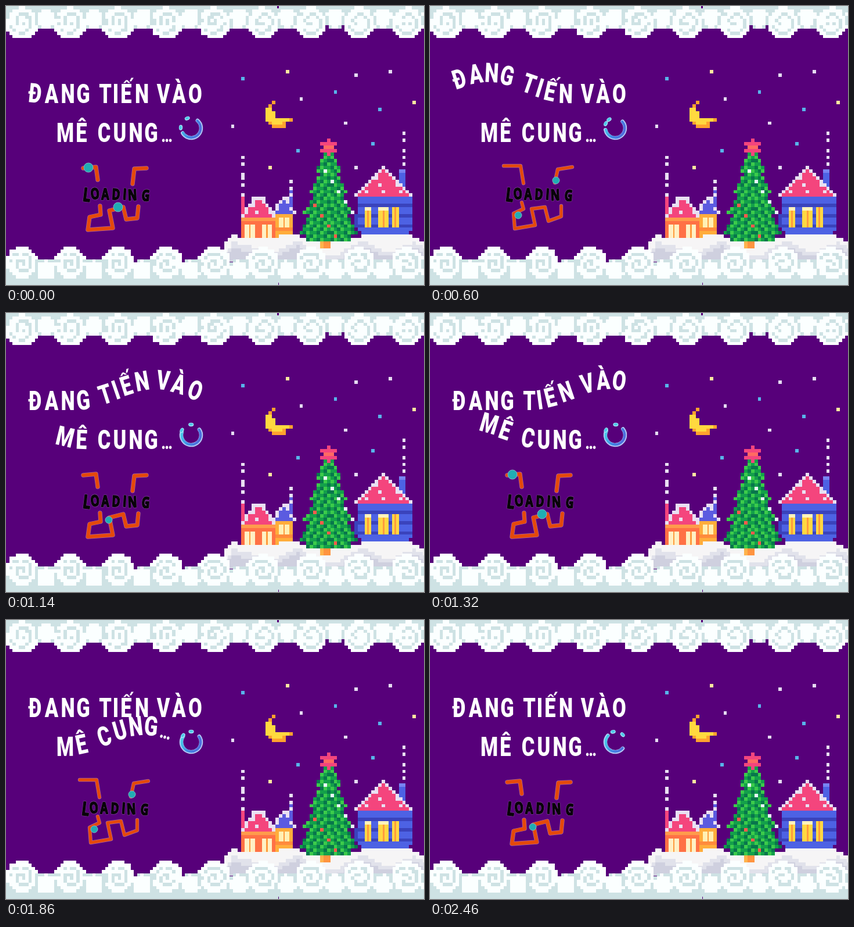
Recreate the animation shown at these times as an HTML page with a canvas. Size 720 by 480 pixels, loop 2520 ms.

```html
<!DOCTYPE html>
<html lang="vi">
<head>
<meta charset="utf-8">
<style>
  html, body { margin: 0; width: 100%; height: 100%; overflow: hidden; background: #57007a; }
  canvas { display: block; }
</style>
</head>
<body>
<canvas id="stage" width="720" height="480"></canvas>
<script>
const LOOP = 2520, TICK = 60;
const PURPLE = '#57007a', WHITE = '#fbffff', PALE = '#cee2e4', PINK = '#f4457d', FROST = '#e9e0f2';
const stage = document.getElementById('stage');
const backdrop = document.createElement('canvas');
backdrop.width = 720;
backdrop.height = 480;
let ctx = backdrop.getContext('2d');

// ---------- pixel-art scenery ----------
const CELL = 5.9;
const edgeX = c => Math.round(375.75 + c * CELL);
const edgeY = r => Math.round(110.05 + r * CELL);

function block(c, r, w, h, color) {
  ctx.fillStyle = color;
  const x = edgeX(c), y = edgeY(r);
  ctx.fillRect(x, y, edgeX(c + w) - x, edgeY(r + h) - y);
}

function paint(c0, r0, c1, r1, colorAt) {
  for (let r = r0; r < r1; r++)
    for (let c = c0; c < c1; c++) {
      const color = colorAt(c, r);
      if (color) block(c, r, 1, 1, color);
    }
}

function drawStars() {
  const groups = {
    '#e6dcf2': [[2, 16], [22, 8], [38, 1], [48, 0], [35, 15], [38, 28]],
    '#58b4ea': [[5, 2], [32, 6], [45, 11], [43, 21], [21, 23]],
    '#ffe9a0': [[18, 0], [55, 9], [13, 28]]
  };
  for (const color in groups)
    for (const [c, r] of groups[color]) block(c, r, 1, 1, color);
}

function drawMoon() {
  paint(12, 9, 20, 17, (c, r) => {
    const outer = Math.hypot(c - 15, r - 12.5), inner = Math.hypot(c - 17.1, r - 10.5);
    if (outer > 3.85 || inner < 3.3) return null;
    return outer > 3.1 && (r > 14 || r < 11) ? '#ffa22e' : '#ffd93f';
  });
  block(19, 14, 1, 1, '#ffa22e');
  block(17, 16, 1, 1, '#ffa22e');
}

function roof(mid, top, rows, half, grow, color) {
  for (let i = 0; i < rows; i++) {
    const left = Math.round(mid - half - i * grow), right = Math.round(mid + half + i * grow);
    paint(left, top + i, right, top + i + 1, c => {
      const edge = c === left || c === right - 1;
      return edge || (c + 2 * i) % 5 === 0 && i % 2 ? FROST : color;
    });
  }
}

function smoke(col, rows) {
  for (const r of rows) block(col, r, 1, 1, FROST);
}

function windowPane(c, r, w, h, glow) {
  block(c, r, w, h, glow);
  block(c + w / 2 - 0.25, r, 0.5, h, '#ff9b3d');
}

function drawHouses() {
  block(15, 42, 5, 7, '#ffad3b');
  block(15, 46, 5, 1, '#ff8b3c');
  windowPane(16, 43, 3, 3, '#fff0b4');
  roof(17.5, 37, 5, 1, 0.55, '#5b5be0');
  block(19, 35, 1, 5, '#5b5be0');
  smoke(19, [32, 34, 36]);

  block(5, 37, 1, 5, PINK);
  smoke(5, [25, 27, 30, 31, 33, 36]);
  block(5, 43, 10, 7, '#ff7145');
  block(5, 43, 10, 1, '#ff9b4c');
  windowPane(6, 45, 3, 4, '#fff0c4');
  windowPane(11, 45, 3, 4, '#fff0c4');
  roof(10, 38, 5, 2, 0.8, PINK);
  block(8, 37, 4, 1, FROST);

  paint(39, 37, 55, 49, (c, r) =>
    r > 46 && (c === 39 || c === 54) ? null : r % 3 ? '#4d62e4' : '#3a43bc');
  block(38, 42, 1, 4, '#3a43bc');
  windowPane(41, 40, 2, 6, '#ffd842');
  windowPane(45, 40, 3, 6, '#ffd842');
  windowPane(49, 40, 2, 6, '#ffd842');
  block(41, 40, 2, 1, '#fff3bb');
  block(45, 40, 3, 1, '#fff3bb');
  block(51, 30, 2, 6, '#4d62e4');
  block(51, 29, 2, 1, '#7884f2');
  smoke(52, [18, 20, 23, 25, 27]);
  roof(46.5, 28, 9, 0.7, 0.94, PINK);
}

function drawSnow() {
  const ridge = [[0, 50], [2, 48], [5, 49.5], [14, 48.6], [21, 48.2], [24, 50], [36, 49.4], [40, 48.4], [53, 48], [56, 49], [59, 51]];
  const topAt = c => {
    const k = Math.max(1, ridge.findIndex(p => p[0] >= c));
    const [a, b] = [ridge[k - 1], ridge[k]];
    return a[1] + (b[1] - a[1]) * (c - a[0]) / (b[0] - a[0]);
  };
  paint(0, 47, 59, 56, (c, r) => {
    const depth = r - topAt(c);
    if (depth < -0.5) return null;
    const shade = depth + 1.6 * Math.sin(c * 0.36);
    return shade > 4.2 ? '#cfd0df' : shade > 2.6 ? '#e1e2eb' : '#f6f5f6';
  });
}

function drawTree() {
  const baubles = ['#ff5a4c', '#ffe05a', '#ff7fae', '#eaf6ff', '#ff9b3d'];
  block(28, 49, 3, 3, '#ff9440');
  block(28, 49, 1, 3, '#ffb34c');
  paint(21, 24, 40, 50, (c, r) => {
    const t = r - 24, dx = c - 30;
    const half = 1 + t * 0.255 + (t % 6) / 6 * 2 - (t > 23 ? 1 : 0);
    if (Math.abs(dx) > half) return null;
    if ((c * 7 + r * 5) % 29 === 0) return baubles[(c + r) % 5];
    const tone = (c * 2 + r * 3 + (dx > 0 ? r : 0)) % 7;
    return tone < 2 ? '#3ccb4b' : tone < 5 ? '#13a04a' : '#08764c';
  });
  block(30, 20, 1, 5, PINK);
  block(28, 21, 5, 1, PINK);
  block(29, 22, 3, 1, '#ff6a62');
  block(28, 23, 2, 1, PINK);
  block(31, 23, 2, 1, PINK);
}

// Swirled clouds; "depth" counts from the outer edge of the stage.
function cloudBorder(bottom) {
  const size = 5.5, bigY = bottom ? 36 : 27, smallY = bottom ? 25 : 21;
  const wrap = (x, mid) => (x - mid + 8300 + 41.5) % 83 - 41.5;
  for (let row = 0; row < 12; row++)
    for (let col = 0; col < 131; col++) {
      const x = (col + 0.5) * size, y = (row + 0.5) * size;
      const bx = wrap(x, 27), by = y - bigY, d = Math.hypot(bx, by);
      const s = Math.hypot(wrap(x, 68.5), y - smallY);
      let color = y < (bottom ? 30 : 26) ? PALE : null;
      if (s < 20) color = PALE;
      if (s < 16.5) color = WHITE;
      if (d < 29) {
        const turn = Math.atan2(by, bx) / (2 * Math.PI) + 1;
        const coil = (d / 13 - turn + 3) % 1;
        color = d < 21 && coil < 0.38 ? PALE : WHITE;
        if (d > 25 && by < 6) color = PALE;
      }
      if (!color) continue;
      ctx.fillStyle = color;
      const left = Math.round(col * size), top = Math.round(row * size);
      const w = Math.round((col + 1) * size) - left, h = Math.round((row + 1) * size) - top;
      ctx.fillRect(left, bottom ? 480 - top - h : top, w, h);
    }
}

function drawBackdrop() {
  ctx.fillStyle = PURPLE;
  ctx.fillRect(0, 0, 720, 480);
  drawStars();
  drawMoon();
  drawHouses();
  drawSnow();
  drawTree();
  cloudBorder(false);
  cloudBorder(true);
  ctx.fillStyle = PURPLE;
  ctx.fillRect(467, 0, 3, 4);
  ctx.fillRect(469, 476, 1, 4);
}

// ---------- waving title ----------
const LINES = [
  { glyphs: 'ĐANGTIẾNVÀO', at: [50, 78.5, 106.5, 133, 171, 189, 207, 234, 271, 298, 326], y: 150.5, crest: t => 100 + 0.29 * (t - 600) },
  { glyphs: 'MÊCUNG…', at: [102, 130, 169, 196, 223.5, 250, 277], y: 217.5, crest: t => 58 + t / 3 - 440 }
];
const RISE = 36, REACH = 137, CONDENSED = 0.74;

function drawTitle(t) {
  ctx.fillStyle = '#fff';
  ctx.textAlign = 'center';
  for (const line of LINES)
    [...line.glyphs].forEach((glyph, i) => {
      const dx = line.at[i] - line.crest(t);
      const near = Math.abs(dx) < REACH;
      const lift = near ? RISE * Math.cos(Math.PI * dx / (2 * REACH)) ** 2 : 0;
      const slope = near ? RISE * Math.PI / (2 * REACH) * Math.sin(Math.PI * dx / REACH) : 0;
      ctx.save();
      ctx.translate(line.at[i], line.y - lift);
      ctx.rotate(Math.atan(slope) * 0.85);
      ctx.scale(CONDENSED, 1);
      ctx.font = `900 ${glyph === '…' ? 34 : 46.5}px Roboto, sans-serif`;
      ctx.fillText(glyph, 0, 16.5);
      ctx.restore();
    });
}

// ---------- smiling spinner ----------
// time, right end, left end, two eyes (degrees)
const SMILE = [
  [0, -50, 150, 183, 248], [600, -42, 170, 205, 234], [900, -30, 185, 205, 264], [1320, -38, 205, 208, 273],
  [1860, -35, 215, 218, 270], [2220, 15, 220, 245, 301], [2460, 40, 222, 258, 315]
];

function smileAt(t) {
  const k = SMILE.findIndex(p => p[0] > t);
  if (k < 0) return SMILE[SMILE.length - 1];
  const a = SMILE[k - 1], b = SMILE[k], f = (t - a[0]) / (b[0] - a[0]);
  return a.map((v, i) => v + (b[i] - v) * f);
}

function drawSpinner(t) {
  const [, right, left, ...eyes] = smileAt(t).map((v, i) => i ? v * Math.PI / 180 : v);
  ctx.save();
  ctx.translate(319, 210);
  ctx.lineCap = 'round';
  const blue = ctx.createLinearGradient(-18, -6, 18, 8);
  blue.addColorStop(0, '#49d5ea');
  blue.addColorStop(0.5, '#3f86e4');
  blue.addColorStop(1, '#5268dc');
  for (const [width, color, r] of [[6.5, '#b4cdf6', 17], [4.2, blue, 16.3]]) {
    ctx.lineWidth = width;
    ctx.strokeStyle = color;
    ctx.beginPath();
    ctx.arc(0, 0, r, right, left);
    ctx.stroke();
  }
  for (const a of eyes) {
    ctx.save();
    ctx.rotate(a);
    ctx.beginPath();
    ctx.ellipse(18, 0, 3.2, 4.6, 0, 0, 2 * Math.PI);
    ctx.fillStyle = '#a6e6f6';
    ctx.fill();
    ctx.beginPath();
    ctx.ellipse(18.4, 0, 2.2, 3.4, 0, 0, 2 * Math.PI);
    ctx.fillStyle = '#4ec9ea';
    ctx.fill();
    ctx.restore();
  }
  ctx.restore();
}

// ---------- hand-drawn maze ----------
const POSES = [
  { width: 6, shift: 2, paths: [
    [[133, 279], [155, 277], [158, 299]],
    [[242, 279], [221, 280], [218, 306]],
    [[162, 344], [163, 359], [144, 363], [141, 385], [184, 382], [178, 352], [202, 346], [207, 367], [226, 365], [228, 345]]] },
  { width: 5, shift: 0, paths: [
    [[127, 275], [156, 275], [161, 305]],
    [[245, 277], [220, 281], [215, 304]],
    [[158, 338], [161, 349], [144, 357], [146, 383], [181, 377], [175, 349], [198, 346], [204, 370], [226, 362], [226, 344]]] }
];
const UPPER_BALL = [[142, 278], [157, 284], [159, 300], [217, 300], [218, 290], [220, 280], [245, 274], null];
const LOWER_BALL = [[193, 346], [206, 366], [227, 348], [152, 360], [143, 370], [146, 381], [168, 379], [177, 356]];
const BALL_SIZE = [8, 8, 7, 6, 7, 7, 7, 6];

function lettering(shift) {
  const at = [137, 153, 170, 188, 203, 217, 239];
  const drop = [336, 332, 333, 333, 333, 334, 335];
  ctx.lineJoin = 'round';
  ctx.textAlign = 'center';
  [...'LOADING'].forEach((glyph, i) => {
    ctx.save();
    ctx.translate(at[i] + shift - 1, drop[i]);
    ctx.rotate([0.12, -0.1, 0, 0.04, 0.06, -0.05, 0.08][i]);
    ctx.scale(CONDENSED, 1);
    ctx.font = `700 ${i ? 26 : 32}px "Open Sans", sans-serif`;
    ctx.lineWidth = 3.2;
    ctx.strokeStyle = 'rgba(190, 150, 205, .5)';
    ctx.strokeText(glyph, 0, 0);
    ctx.lineWidth = 2;
    ctx.strokeStyle = ctx.fillStyle = '#080309';
    ctx.strokeText(glyph, 0, 0);
    ctx.fillText(glyph, 0, 0);
    ctx.restore();
  });
}

function drawMaze(t) {
  const step = Math.floor(t % (LOOP / 2) / (LOOP / 16));
  const pose = POSES[step > 1 && step < 7 ? 1 : 0];
  ctx.lineCap = ctx.lineJoin = 'round';
  for (const [extra, color] of [[1.4, 'rgba(225, 175, 190, .6)'], [0, '#e5490b']]) {
    ctx.lineWidth = pose.width + extra;
    ctx.strokeStyle = color;
    for (const path of pose.paths) {
      ctx.beginPath();
      path.forEach(([x, y]) => ctx.lineTo(x, y));
      ctx.stroke();
    }
  }
  lettering(pose.shift);
  for (const ball of [UPPER_BALL[step], LOWER_BALL[step]]) {
    if (!ball) continue;
    ctx.beginPath();
    ctx.arc(ball[0], ball[1], BALL_SIZE[step], 0, 2 * Math.PI);
    ctx.fillStyle = '#20adb4';
    ctx.fill();
    ctx.lineWidth = 1;
    ctx.strokeStyle = '#7fb6c4';
    ctx.stroke();
  }
}

drawBackdrop();
ctx = stage.getContext('2d');
const start = performance.now();

function frame() {
  const t = Math.floor((performance.now() - start) % LOOP / TICK) * TICK;
  ctx.drawImage(backdrop, 0, 0);
  drawTitle(t);
  drawSpinner(t);
  drawMaze(t);
  requestAnimationFrame(frame);
}
frame();
</script>
</body>
</html>
```
